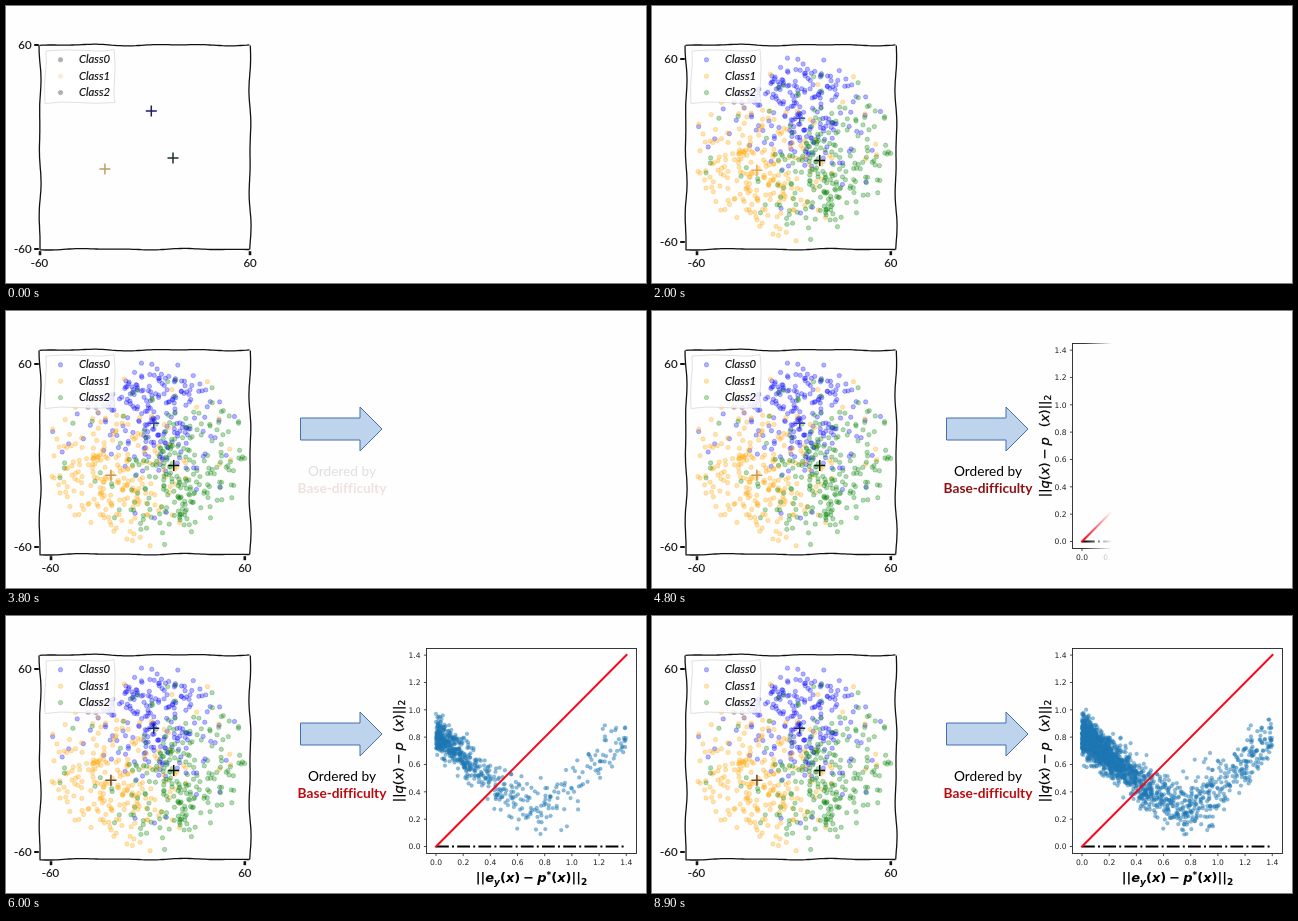
These frames come from a looping animation (640 px wide and 277 px high, 9000 ms). An HTML page:

```html
<!DOCTYPE html>
<html lang="en">
<head>
<meta charset="utf-8">
<title>Class scatter ordered by difficulty</title>
<style>
  html, body { margin: 0; width: 100%; height: 100%; overflow: hidden; background: #fefefe; }
  svg { display: block; width: 100vw; height: 100vh; }
  text { font-variant-ligatures: none; }
  .hand { font: 400 11.4px Lato, sans-serif; fill: #111; stroke: #111; stroke-width: .15; }
  .legend { font-style: italic; font-size: 11.3px; }
  .note { font: 13.7px Lato, sans-serif; text-anchor: middle; }
  .tick { font: 7.6px "DejaVu Sans", sans-serif; fill: #222; }
  .math { font: 13px "DejaVu Sans", sans-serif; text-anchor: middle; fill: #000; }
  .heavy { font-weight: 700; }
  .math .i { font-style: oblique; }
  .math .s { font-size: 9px; }
  .mid { text-anchor: middle; }
  .end { text-anchor: end; }
</style>
</head>
<body>
<svg viewBox="0 0 640 277" preserveAspectRatio="none">
  <defs>
    <linearGradient id="edge" gradientUnits="userSpaceOnUse" x1="0" x2="28" y1="0" y2="0">
      <stop offset="0" stop-color="#fff"/>
      <stop offset="1" stop-color="#000"/>
    </linearGradient>
    <mask id="wipe" maskUnits="userSpaceOnUse" x="380" y="0" width="260" height="277">
      <rect x="380" width="260" height="277" fill="url(#edge)"/>
    </mask>
  </defs>

  <g id="left"></g>

  <path id="arrow" d="M294.5 107H354V96L376 118L354 140V129H294.5Z" fill="#bdd4ec" stroke="#456fae" stroke-width="1"/>
  <g id="caption" class="note">
    <text x="336" y="164.5" fill="#000">Ordered by</text>
    <text id="bold" class="heavy" x="336" y="182">Base-difficulty</text>
  </g>

  <g id="right" mask="url(#wipe)">
    <g id="cloud" fill="#1f77b4" fill-opacity=".5" stroke="#1f77b4" stroke-opacity=".3" stroke-width=".5"></g>
    <path d="M430 230.5H619.5" stroke="#000" stroke-width="2" stroke-dasharray="12.8 3.2 2 3.2"/>
    <path d="M430 230.5L620.5 39" stroke="#f8081c" stroke-width="2" stroke-linecap="square"/>
    <rect x="420.5" y="32.5" width="210" height="205" fill="none" stroke="#222" stroke-width=".9"/>
    <g id="ticks"></g>
    <text class="math heavy" x="525.5" y="265.5">||<tspan class="i">e</tspan><tspan class="i s" dy="3">y</tspan><tspan dy="-3">(</tspan><tspan class="i">x</tspan>)<tspan dx="3">−</tspan><tspan class="i" dx="3">p</tspan><tspan class="s" dy="-4">*</tspan><tspan dy="4">(</tspan><tspan class="i">x</tspan>)||<tspan class="s" dy="3">2</tspan></text>
    <text class="math" transform="translate(396.5 135) rotate(-90)" stroke="#000" stroke-width=".25">||<tspan class="i">q</tspan>(<tspan class="i">x</tspan>)<tspan dx="3">−</tspan><tspan class="i" dx="3">p</tspan><tspan dx="10">(</tspan><tspan class="i">x</tspan>)||<tspan class="s" dy="2.5">2</tspan></text>
  </g>
</svg>
<script>
const LOOP = 9000;
const $ = id => document.getElementById(id);
const clamp = v => Math.max(0, Math.min(1, v));
const lerp = (a, b, k) => a + (b - a) * k;

function set(el, attrs) {
  for (const k in attrs) el.setAttribute(k, attrs[k]);
  return el;
}

function add(parent, tag, attrs, text) {
  const el = set(document.createElementNS('http://www.w3.org/2000/svg', tag), attrs);
  if (text !== undefined) el.textContent = text;
  parent.appendChild(el);
  return el;
}

function seeded(seed) {
  return () => {
    seed = (seed + 0x6D2B79F5) | 0;
    let r = Math.imul(seed ^ (seed >>> 15), 1 | seed);
    r = (r + Math.imul(r ^ (r >>> 7), 61 | r)) ^ r;
    return ((r ^ (r >>> 14)) >>> 0) / 4294967296;
  };
}

const gauss = rnd => Math.sqrt(-2 * Math.log(1 - rnd())) * Math.cos(2 * Math.PI * rnd());

// A line with a hand-drawn wobble across its direction.
function sketch(x1, y1, x2, y2, amp, phase) {
  const len = Math.hypot(x2 - x1, y2 - y1);
  const nx = -(y2 - y1) / len, ny = (x2 - x1) / len;
  let d = '';
  for (let s = 0; s <= len; s += 3) {
    const o = amp * (0.5 * Math.sin(s / 8.5 + phase) + 0.7 * Math.sin(s / 15 + phase * 2));
    const k = s / len;
    d += (d ? 'L' : 'M') + (lerp(x1, x2, k) + nx * o).toFixed(1) + ' ' + (lerp(y1, y2, k) + ny * o).toFixed(1);
  }
  return d;
}

// Times at which the picture moves on; it holds in between.
const steps = [0, 100, 800, 1000, 1100, 1200, 1400, 1600, 1800, 2000];
for (let t = 2700; t <= 5200; t += 100) steps.push(t);
steps.push(5700, 5800, 6000, 6200, 6300, 6500, 6800, 7000, 7100, 7900, 8000, 8100, 8900);

// Left plot
const left = $('left');
const classes = [
  { color: '#0000ff', pale: '#b0b0b0', x: 3.6, y: 21.2, cx: 4, cy: 29, sx: 23, sy: 20 },
  { color: '#ffa500', pale: '#fdebd3', x: -22.9, y: -12.9, cx: -27, cy: -15, sx: 22, sy: 21 },
  { color: '#008000', pale: '#b0b0b0', x: 16, y: -6.5, cx: 22, cy: -10, sx: 21, sy: 22 }
];
const PER_CLASS = 225;
const rnd = seeded(41);

function classPoint(c) {
  const stray = rnd() < 0.1;
  for (;;) {
    const x = stray ? lerp(-60, 60, rnd()) : c.cx + gauss(rnd) * c.sx;
    const y = stray ? lerp(-60, 62, rnd()) : c.cy + gauss(rnd) * c.sy;
    if (Math.hypot((x + 1) / 61, (y - 1.5) / 61) < 1) return { x, y };
  }
}

for (const c of classes) {
  const g = add(left, 'g', {
    fill: c.color, 'fill-opacity': 0.3, stroke: c.color, 'stroke-opacity': 0.3, 'stroke-width': 0.8
  });
  c.points = Array.from({ length: PER_CLASS }, () => {
    const p = classPoint(c);
    p.el = add(g, 'circle', { r: 2.2 });
    return p;
  });
}
for (const c of classes) c.cross = add(left, 'path', { 'stroke-width': 1.5 });

const spine = d => add(left, 'path', { d, fill: 'none', stroke: '#111', 'stroke-width': 1.3 });
spine(sketch(34, 39.5, 34, 243.5, 0.9, 1));
spine(sketch(244, 39.5, 244, 243.5, 0.9, 2.5));
spine(sketch(33.5, 39, 244, 39, 0.8, 4));
spine(sketch(33.5, 243.2, 244, 243.2, 0.7, 0.5));

add(left, 'path', {
  d: 'M40 45Q60 43 80 44.5T108 43.5Q110 60 108.5 75T109 96.5Q90 98 72 96.5T39 97.5Q38 80 39.5 68T40 45Z',
  fill: '#fff', 'fill-opacity': 0.85, stroke: '#d8d8d8', 'stroke-width': 0.8
});
classes.forEach((c, i) => {
  const y = 53.8 + i * 16.4;
  c.key = add(left, 'circle', { cx: 54.5, cy: y, r: 2.2, 'stroke-width': 0.8 });
  add(left, 'text', { x: 73, y: y + 3.5, class: 'hand legend' }, 'Class' + i);
});

const marks = [60, -60].map(v => ({
  v,
  tx: add(left, 'path', { stroke: '#111', 'stroke-width': 2.6 }),
  ty: add(left, 'path', { stroke: '#111', 'stroke-width': 2 }),
  lx: add(left, 'text', { y: 261, class: 'hand mid' }, v),
  ly: add(left, 'text', { x: 25.5, class: 'hand end' }, v)
}));

function crossColors(t) {
  if (t < 800) return ['#1c1c66', '#b9a06c', '#1c302a'];
  if (t < 2700) return ['#4a4ad8', '#efa850', '#151515'];
  if (t < 3700) return ['#20207a', '#efb65c', '#102010'];
  if (t < 5700) return ['#3c3cb8', '#cf9648', '#101810'];
  return ['#20207a', '#6b4a28', '#0c140c'];
}

function drawLeft(t) {
  const started = t >= 800;
  const k = clamp((t - 800) / 1200);
  const x0 = started ? 45 : 34, x1 = started ? 238.8 : 244;
  const y0 = started ? 236 : 243, y1 = started ? lerp(47, 53, k) : 39;
  const px = v => lerp(x0, x1, (v + 60) / 120);
  const py = v => lerp(y0, y1, (v + 60) / 120);
  const shown = started ? Math.round(lerp(50, PER_CLASS, k)) : 0;
  const inks = crossColors(t);

  classes.forEach((c, i) => {
    c.points.forEach((p, j) => set(p.el, {
      cx: px(p.x), cy: py(p.y), display: j < shown ? 'inline' : 'none'
    }));
    const x = px(c.x), y = py(c.y);
    set(c.cross, { d: `M${x - 5.5} ${y}h11M${x} ${y - 5.5}v11`, stroke: inks[i] });
    const flat = t < 100;
    const ink = flat ? c.pale : c.color;
    set(c.key, { fill: ink, stroke: ink, 'fill-opacity': flat ? 1 : 0.3, 'stroke-opacity': flat ? 1 : 0.3 });
  });
  for (const m of marks) {
    const x = px(m.v), y = py(m.v);
    set(m.tx, { d: `M${x} 245.2v4` });
    set(m.ty, { d: `M28.2 ${y}h4.6` });
    set(m.lx, { x: m.v < 0 ? x - 0.5 : x });
    set(m.ly, { y: y + 4 });
  }
}

// Right plot
const rx = v => 430 + v * 135.9;
const ry = v => 230.5 - v * 136.7;
for (let i = 0; i <= 7; i++) {
  const v = i / 5, x = rx(v), y = ry(v), label = v.toFixed(1);
  add($('ticks'), 'path', { d: `M${x} 237.5v2.6M420.5 ${y}h-2.6`, stroke: '#222', 'stroke-width': 0.8 });
  add($('ticks'), 'text', { x, y: 249, class: 'tick mid' }, label);
  add($('ticks'), 'text', { x: 414.5, y: y + 2.8, class: 'tick end' }, label);
}

// Two straight trends joined by a smooth maximum.
const trend = x => 0.2 * Math.log(Math.exp((0.83 - 0.85 * x) / 0.2) + Math.exp((1.06 * x - 0.67) / 0.2));
const CLOUD = 2000;
const rnd2 = seeded(7);
const cloud = Array.from({ length: CLOUD }, () => {
  let x, y;
  do {
    x = rnd2() < 0.3 ? 1.4 * rnd2() : -0.18 * Math.log(1 - rnd2());
    const spread = 0.065 + 0.05 * Math.exp(-(((x - 0.9) / 0.35) ** 2));
    y = trend(x) + gauss(rnd2) * spread;
  } while (x > 1.4 || y < 0.03 || y > 1.01);
  return add($('cloud'), 'circle', { cx: rx(x), cy: ry(y), r: 1.9 });
});

function cloudSize(t) {
  if (t < 5700) return 0;
  return t < 6000 ? 600 - (6000 - t) : Math.round(lerp(600, CLOUD, (t - 6000) / 2900));
}

function draw(t) {
  drawLeft(t);
  set($('arrow'), { opacity: clamp((t - 2690) / 910) });
  set($('caption'), { opacity: clamp((t - 3690) / 910) });
  set($('bold'), { fill: t < 5700 ? '#8f1014' : '#bd0a0e' });

  set($('right'), { display: t < 4700 ? 'none' : 'inline' });
  const edge = 410 + (t - 4700) / 2;
  set($('edge'), { x1: edge - 28, x2: edge });
  const n = cloudSize(t);
  cloud.forEach((el, i) => set(el, { display: i < n ? 'inline' : 'none' }));
}

const start = performance.now();
let last = -1;
function tick() {
  const t = (performance.now() - start) % LOOP;
  const step = steps.filter(s => s <= t).pop() || 0;
  if (step !== last) draw(last = step);
  requestAnimationFrame(tick);
}
tick();
</script>
</body>
</html>
```
